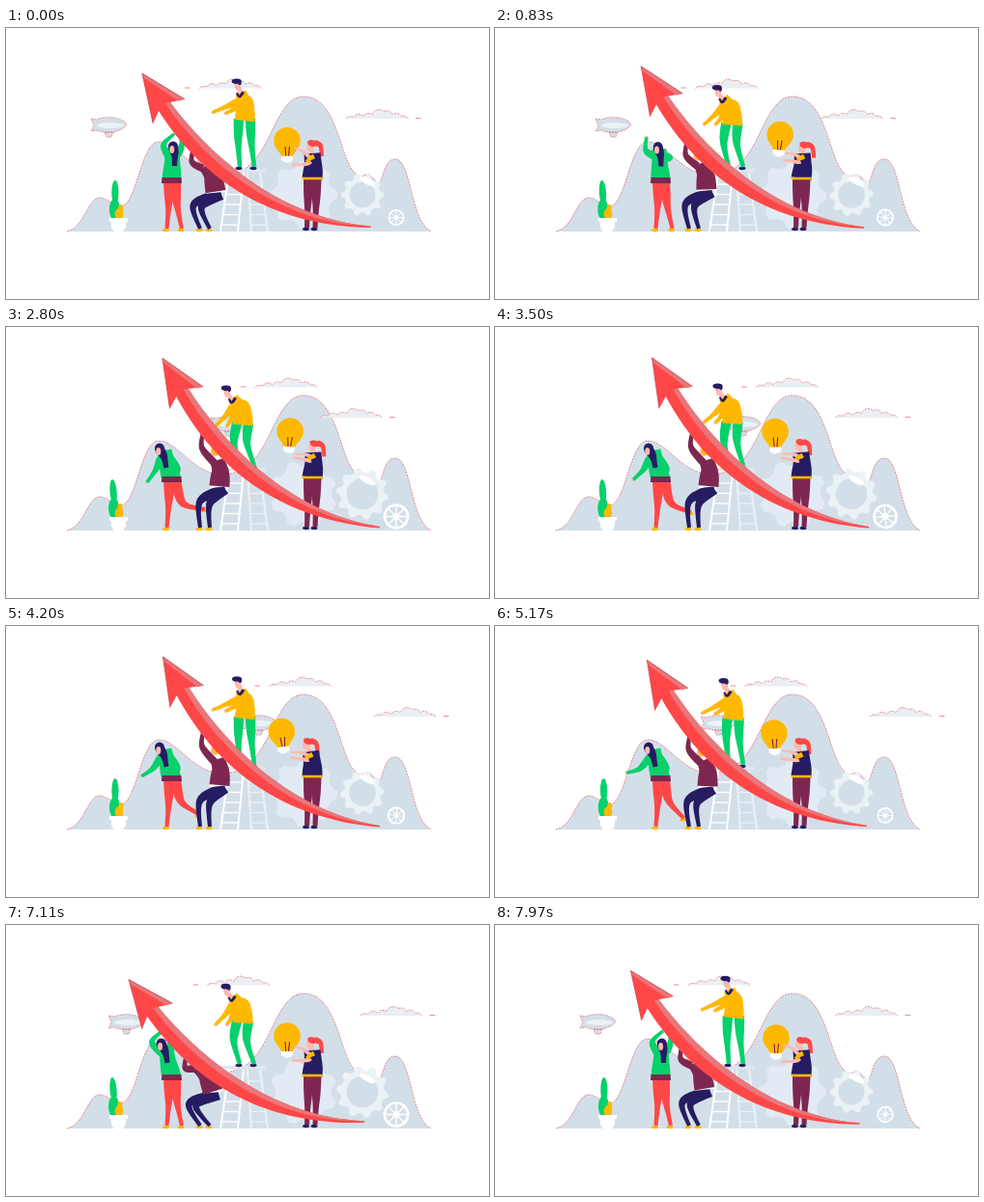
Recreate the animation shown at these times as an HTML page with a canvas. Size 500 by 281 pixels, loop 8000 ms.

```html
<!DOCTYPE html>
<html lang="en">
<head>
<meta charset="utf-8">
<title>Lifting the arrow</title>
<style>
  html, body { margin: 0; width: 100%; height: 100%; overflow: hidden; background: #fff; }
  canvas { display: block; width: 500px; height: 281px; }
</style>
</head>
<body>
<canvas id="stage" width="500" height="281"></canvas>
<script>
const ctx = document.getElementById('stage').getContext('2d');
const LOOP = 8000;

const C = {
  hill: '#d3dfe8', gear: '#e2ebf3', pale: '#ebf2f6', cloud: '#e9eff3', edge: '#e8707c',
  red: '#ff4747', side: '#e8777b', green: '#07d06c', yellow: '#ffb800',
  navy: '#261c62', plum: '#7d2750', skin: '#ffb9b0', white: '#fff'
};

// ---- timing ----
const part = (t, a, b) => Math.min(1, Math.max(0, (t - a) / (b - a)));
const ease = (t, a, b) => (1 - Math.cos(Math.PI * part(t, a, b))) / 2;
// Rises from 0 to 1 and back between a and b; skew moves the peak.
const hump = (t, a, b, skew = 1) => Math.sin(Math.PI * part(t, a, b) ** skew);

// Height of the arrow: slows on the way up, rests, then drops with growing speed.
function liftAt(t) {
  const low = 7150, rest = 4100;
  if (t >= rest && t < low) return 1 - part(t, rest, low) ** 1.9;
  const since = (t - low + LOOP) % LOOP;
  return 1 - (1 - part(since, 0, 4550)) ** 2.6;
}

// ---- points and poses ----
const add = (p, x, y) => [p[0] + x, p[1] + y];
const between = (a, b, u = 0.5) => a.map((v, i) => v + (b[i] - v) * u);
const mix = (p, q, u) =>
  Object.fromEntries(Object.keys(p).map(k => [k, between(p[k], q[k], u)]));

const LIFTER = {
  push: {
    head: [173, 124], elbowA: [163, 121], handA: [174, 110],
    elbowB: [182, 121], handB: [180, 110], kneeB: [177, 183], footB: [182, 208]
  },
  wave: {
    head: [165, 125], elbowA: [150, 132], handA: [142, 116],
    elbowB: [181, 147], handB: [174, 162], kneeB: [179, 183], footB: [185, 208]
  },
  brace: {
    head: [159, 127], elbowA: [148, 148], handA: [133, 149],
    elbowB: [178, 149], handB: [165, 158], kneeB: [179, 181], footB: [192, 203]
  }
};
const PUSHER = {
  low: {
    head: [194, 142], neck: [198, 146], hip: [214, 173], elbow: [185, 149],
    hand: [186, 136], kneeA: [189, 185], kneeB: [196, 187]
  },
  high: {
    head: [217, 128], neck: [219, 138], hip: [221, 165], elbow: [203, 125],
    hand: [204, 110], kneeA: [201, 180], kneeB: [211, 183]
  }
};
const CLIMBER = {
  upright: { head: [240, 60], neck: [243, 68], hip: [247, 96], elbow: [231, 80], hand: [214, 87] },
  bent: { head: [228, 69], neck: [234, 76], hip: [245, 102], elbow: [228, 92], hand: [217, 104] }
};

// ---- scenery shapes ----
const hills = new Path2D(`M63,211 C82,207 84,176 97,176 C106,176 112,187 120,185
  C136,180 140,118 158,118 C175,118 188,143 212,151 C225,155 240,152 250,144
  C276,124 281,71 308,71 C344,71 345,137 362,151 Q366,156 370,153 Q376,150 379,155
  Q384,158 384,164 C391,160 390,136 403,136 C420,136 418,200 440,211`);
const puff = new Path2D(`M200,62.5 Q203,59 208,61 Q212,55 218,60 Q221,55 227,58
  Q232,50 239,55 Q245,53 248,58 Q254,55 257,60 Q262,59 264,62.5`);
const ship = new Path2D(`M-19,-7 L-13,-6 C-4,-10 13,-9 18,-1 C12,8 -4,9 -13,5 L-19,6 L-16,0 Z
  M-5,7 H4 L2,12 H-3 Z`);
const shaft = new Path2D(`M140,49 L184,76 L169,79 C207,131 280,200 376,208.5 V210
  C260,208 194,147 157,88 L151,101 Z`);
const rim = new Path2D(`M140,49 L184,76 L178,78 L142,54 Z
  M169,79 C207,131 280,200 376,208.5 C277,206 200,135 164,80 Z`);
const pot = new Path2D('M107,197 H126 V201 H124 Q125,208 121,211 H112 Q108,208 109,201 H107 Z');

// ---- drawing helpers ----
function fill(color, path) { ctx.fillStyle = color; ctx.fill(path); }

function edged(color, path) {
  fill(color, path);
  ctx.strokeStyle = C.edge;
  ctx.lineWidth = 0.8;
  ctx.setLineDash([2, 1]);
  ctx.stroke(path);
  ctx.setLineDash([]);
}

function at(x, y, draw, turn = 0, scale = 1) {
  ctx.save();
  ctx.translate(x, y);
  ctx.rotate(turn);
  ctx.scale(scale, scale);
  draw();
  ctx.restore();
}

function oval(color, x, y, rx, ry = rx, turn = 0) {
  ctx.beginPath();
  ctx.ellipse(x, y, rx, ry, turn, 0, 7);
  ctx.fillStyle = color;
  ctx.fill();
}

function line(color, width, ...pts) {
  ctx.beginPath();
  pts.forEach(p => ctx.lineTo(p[0], p[1]));
  ctx.strokeStyle = color;
  ctx.lineWidth = width;
  ctx.stroke();
}

// Tapered limb from a to c with a firm bend at b.
function limb(color, a, b, c, w0, w1) {
  const bend = 3, k = between(between(a, c), b, 1.3);
  const spot = u => {
    const v = 1 - u, wa = v * v, wk = 2 * u * v * bend, wc = u * u;
    return [0, 1].map(i => (wa * a[i] + wk * k[i] + wc * c[i]) / (wa + wk + wc));
  };
  const left = [], right = [];
  for (let s = 0; s <= 16; s++) {
    const u = s / 16, r = (w0 + (w1 - w0) * u) / 2;
    const p = spot(u), q = spot(u - 0.01), n = spot(u + 0.01);
    const dx = n[0] - q[0], dy = n[1] - q[1], len = Math.hypot(dx, dy) || 1;
    left.push(add(p, -dy / len * r, dx / len * r));
    right.unshift(add(p, dy / len * r, -dx / len * r));
  }
  ctx.beginPath();
  left.concat(right).forEach(p => ctx.lineTo(p[0], p[1]));
  ctx.fillStyle = color;
  ctx.fill();
}

function arm(color, a, b, c, w0 = 8, w1 = 3.5) {
  oval(C.skin, c[0], c[1], 1.8);
  limb(color, a, b, c, w0, w1);
}

function leg(color, shoe, a, b, c, w0 = 10, w1 = 4.5) {
  oval(shoe, c[0] - 1, c[1] + 1.5, 3.5, 1.7);
  limb(color, a, b, c, w0, w1);
}

// ---- scenery ----
function cog(color, r, teeth, hole) {
  ctx.beginPath();
  for (let i = 0; i < teeth * 4; i++) {
    const a = (i - 0.5) / (teeth * 4) * 2 * Math.PI;
    const d = i % 4 < 2 ? r : r * 0.83;
    ctx.lineTo(d * Math.cos(a), d * Math.sin(a));
  }
  ctx.closePath();
  if (hole) { ctx.moveTo(hole, 0); ctx.arc(0, 0, hole, 0, 7); }
  ctx.fillStyle = color;
  ctx.fill('evenodd');
}

function wheel() {
  ctx.beginPath();
  ctx.arc(0, 0, 7.6, 0, 7);
  ctx.strokeStyle = C.white;
  ctx.lineWidth = 1.7;
  ctx.stroke();
  for (let i = 0; i < 4; i++) {
    const x = 7 * Math.cos(i * Math.PI / 4), y = 7 * Math.sin(i * Math.PI / 4);
    line(C.white, 0.9, [-x, -y], [x, y]);
  }
  oval(C.white, 0, 0, 2.2);
}

function cloud(dx, dy, dash) {
  at(dx, dy, () => {
    edged(C.cloud, puff);
    line(C.edge, 0.8, [dash, 62], [dash + 5.5, 62]);
  });
}

function ladder() {
  const rails = [[231, 222], [246, 240], [250, 254], [263, 271]];
  for (let i = 0; i < 5; i++) {
    const y = 162 + i * 10.5, u = (y - 150) / 61;
    const x = rails.map(([a, b]) => a + (b - a) * u);
    line(C.white, 1.4, [x[0], y], [x[1], y]);
    line(C.pale, 1.2, [x[2], y], [x[3], y]);
  }
  rails.forEach(([a, b], i) => line(i < 2 ? C.white : C.pale, 2, [a, 150], [b, 211]));
  ctx.fillStyle = '#dde7ed';
  ctx.fillRect(222, 146, 47, 3.5);
}

function plant(lean) {
  oval(C.green, 112.5 - lean, 188, 5.5, 11);
  oval(C.green, 113 - 2 * lean, 171, 3.6, 13, -0.08 * lean);
  oval(C.yellow, 117, 193, 4.3, 6);
  oval(C.yellow, 119 - lean, 187, 2.5, 4);
  fill(C.white, pot);
}

// ---- people ----
function drawClimber(lean) {
  const p = mix(CLIMBER.upright, CLIMBER.bent, lean);
  const back = add(between(p.neck, p.hip), 3 + 2 * lean, -2);
  const reach = between(p.neck, p.hand, 0.85);
  arm(C.yellow, add(p.neck, 2, 7), add(p.elbow, 6, 3), add(reach, 9, 4));
  for (const [x, foot] of [[-6, [242, 144]], [6, [257, 144]]]) {
    const hip = add(p.hip, x, -2);
    leg(C.green, C.navy, hip, add(between(hip, foot), -1 - 4 * lean, -2), foot, 10.5, 4.5);
  }
  limb(C.skin, add(p.head, 1, 0), add(p.head, 2, 3), p.neck, 4, 5);
  limb(C.yellow, add(p.neck, 0, -1), back, p.hip, 12, 21);
  oval(C.yellow, back[0], back[1], 9, 11);
  arm(C.yellow, add(p.neck, 0, 7), p.elbow, p.hand);
  limb(C.navy, add(p.neck, -4, -1), add(p.neck, -1, 3), add(p.neck, 3, -2), 2, 3);
  const [x, y] = p.head;
  oval(C.skin, x, y, 3.2, 4.6, -0.2);
  oval(C.navy, x - 1, y - 5, 5, 2.8);
  oval(C.navy, x + 2.4, y - 3.5, 1.7, 2.5);
}

function lifterPose(t, lift) {
  let p = mix(LIFTER.push, LIFTER.wave, ease(t, 100, 1500));
  const kick = 1 - part(t, 2800, 6000);
  const brace = { ...LIFTER.brace };
  brace.handA = add(brace.handA, 13 * kick, 12 * kick);
  brace.elbowA = add(brace.elbowA, 7 * kick, 0);
  brace.kneeB = add(brace.kneeB, 4 * kick, 2 * kick);
  brace.footB = add(brace.footB, 14 * kick, -14 * kick);
  p = mix(p, brace, ease(t, 1650, 2750));
  p = mix(p, LIFTER.push, ease(t, 6050, 7000));
  // The upper body gives way while the arrow is low.
  const slide = -13 * Math.max(0, 1 - lift / 0.41);
  for (const k of ['head', 'elbowA', 'handA', 'elbowB', 'handB']) p[k] = add(p[k], slide, 0);
  return p;
}

function drawLifter(p) {
  const hip = [171.5, 158];
  const neck = [between(p.head, hip, 0.4)[0], p.head[1] + 6];
  leg(C.red, C.yellow, add(hip, 4, 0), p.kneeB, p.footB, 11, 4);
  leg(C.red, C.yellow, add(hip, -3, 0), [168.5, 182], [166.5, 208], 11, 4);
  arm(C.green, add(neck, 5, 2), p.elbowB, p.handB);
  limb(C.green, add(neck, 0, -5), between(neck, hip), hip, 15, 20);
  limb(C.plum, add(hip, 0, -3), hip, add(hip, 0, 3), 20, 21);
  arm(C.green, add(neck, -4, 3), p.elbowA, p.handA);
  const [x, y] = p.head, hair = add(neck, 2, 13);
  oval(C.navy, x, y - 1, 5, 5.5);
  limb(C.navy, p.head, add(between(p.head, hair), 1, -2), hair, 10, 5);
  oval(C.skin, x - 1.2, y + 2, 2.5, 4);
}

function drawPusher(lift) {
  const p = mix(PUSHER.low, PUSHER.high, lift);
  const seat = add(p.hip, 6, 3);
  leg(C.navy, C.yellow, seat, p.kneeB, [211, 208], 11, 4);
  leg(C.navy, C.yellow, seat, p.kneeA, [201, 208], 11, 4);
  line(C.white, 2, add(p.hip, -10, 1), add(p.hip, 10, -1));
  limb(C.plum, p.neck, add(between(p.neck, p.hip), 2, -2), p.hip, 15, 21);
  oval(C.skin, p.head[0] - 1, p.head[1] + 1, 4, 5);
  oval(C.yellow, p.head[0] + 1, p.head[1], 4.5, 5);
  arm(C.plum, add(p.neck, -3, 3), p.elbow, p.hand, 8, 4);
}

function bulb() {
  oval(C.yellow, 0, 0, 13.8);
  fill(C.yellow, new Path2D('M-11,8 L-5,17 H5 L11,8 Z'));
  line(C.plum, 1.1, [-2, 6], [-1.2, 16]);
  line(C.plum, 1.1, [2.5, 6], [1.5, 16]);
  fill(C.white, new Path2D('M-6,16 H6 V20 Q3,23 0,23 Q-3,23 -6,20 Z'));
}

function drawThinker(t) {
  const sway = hump(t, 0, 3400) - hump(t, 3400, 5400);
  const rise = hump(t, 0, LOOP, 0.6);
  const head = [315.5 + 4.5 * sway, 123 + Math.max(0, 2.5 * sway)];
  const neck = [317 + 1.7 * sway, 132];
  const tail = add(head, 11.5, 10);
  const hand = [296 + 3 * sway, 142 - 7 * rise];
  const elbow = [310.5 + 2 * sway, 141 - 3 * rise];
  limb(C.red, add(head, 4, -4), add(head, 10, -1), tail, 6, 4);
  for (const x of [313, 321.5]) {
    leg(C.plum, C.navy, [x, 156], [x - 0.5, 182], [x - 1.5, 207], 10, 5);
  }
  limb(C.skin, head, between(head, neck), neck, 4, 5);
  limb(C.navy, add(neck, 0, -2), add(between(neck, [317, 156]), 1, 0), [317, 156], 17, 21);
  line(C.yellow, 2.6, [306.5, 156], [327.5, 156]);
  at(291 + 6 * sway, 117 - 9 * rise, bulb, 0.12 * sway);
  const grip = add(hand, 2, -18 + 15 * rise);
  limb(C.skin, add(neck, -3, 2), between(neck, grip), grip, 4, 1.8);
  limb(C.skin, add(neck, -2, 6), elbow, hand, 5.5, 2.5);
  limb(C.yellow, add(neck, 2, 1), add(neck, -2, 3), add(elbow, 1, -2), 5, 4);
  oval(C.skin, head[0] - 1, head[1] + 0.5, 3.4, 4.8);
  oval(C.red, head[0] + 1.5, head[1] - 3.5, 5, 3.3, 0.3);
}

function arrow(lift) {
  const turn = (-3.25 + 7.15 * lift) * Math.PI / 180;
  at(371 + 16 * lift, 204 + 4.5 * Math.sqrt(lift), () => {
    ctx.translate(-376, -210);
    fill(C.red, shaft);
    fill(C.side, rim);
    line('#c9414f', 0.7, [151, 101], [140, 49], [184, 76]);
  }, turn);
}

function draw(t) {
  const swing = ease(t, 0, LOOP / 2) - ease(t, LOOP / 2, LOOP);
  const lift = liftAt(t);
  const lean = Math.sqrt(hump(t, 0, 4200)) + hump(t, 4200, LOOP, 2);
  const grow = hump(t, 0, 4300, 2) + hump(t, 6000, LOOP);
  const drift = 36 * (hump(t, 3500, LOOP, 0.65) - hump(t, 0, 3500, 1.4));

  ctx.clearRect(0, 0, 500, 281);
  edged(C.hill, hills);
  at(308, 173, () => cog(C.gear, 35, 8), grow * 0.4);
  at(369, 173, () => cog(C.pale, 22, 10, 13.5), -grow * 0.5, 1 + grow * 0.23);
  oval(C.white, 374, 159, 9, 3.2, 0.5);
  at(404, 196.5, wheel, grow * 0.8, 1 + grow * 0.59);
  cloud(73 * swing, 0, 185);
  cloud(152 + drift, 31.5, 272);
  at(107 + 156 * swing, 101, () => {
    edged(C.hill, ship);
    oval(C.pale, 1, 0, 14, 3);
  });
  ladder();
  plant(lean);
  drawClimber(lean);
  drawLifter(lifterPose(t, lift));
  drawPusher(lift);
  drawThinker(t);
  arrow(lift);
}

const start = performance.now();
function frame() {
  draw((performance.now() - start) % LOOP);
  requestAnimationFrame(frame);
}
frame();
</script>
</body>
</html>
```
